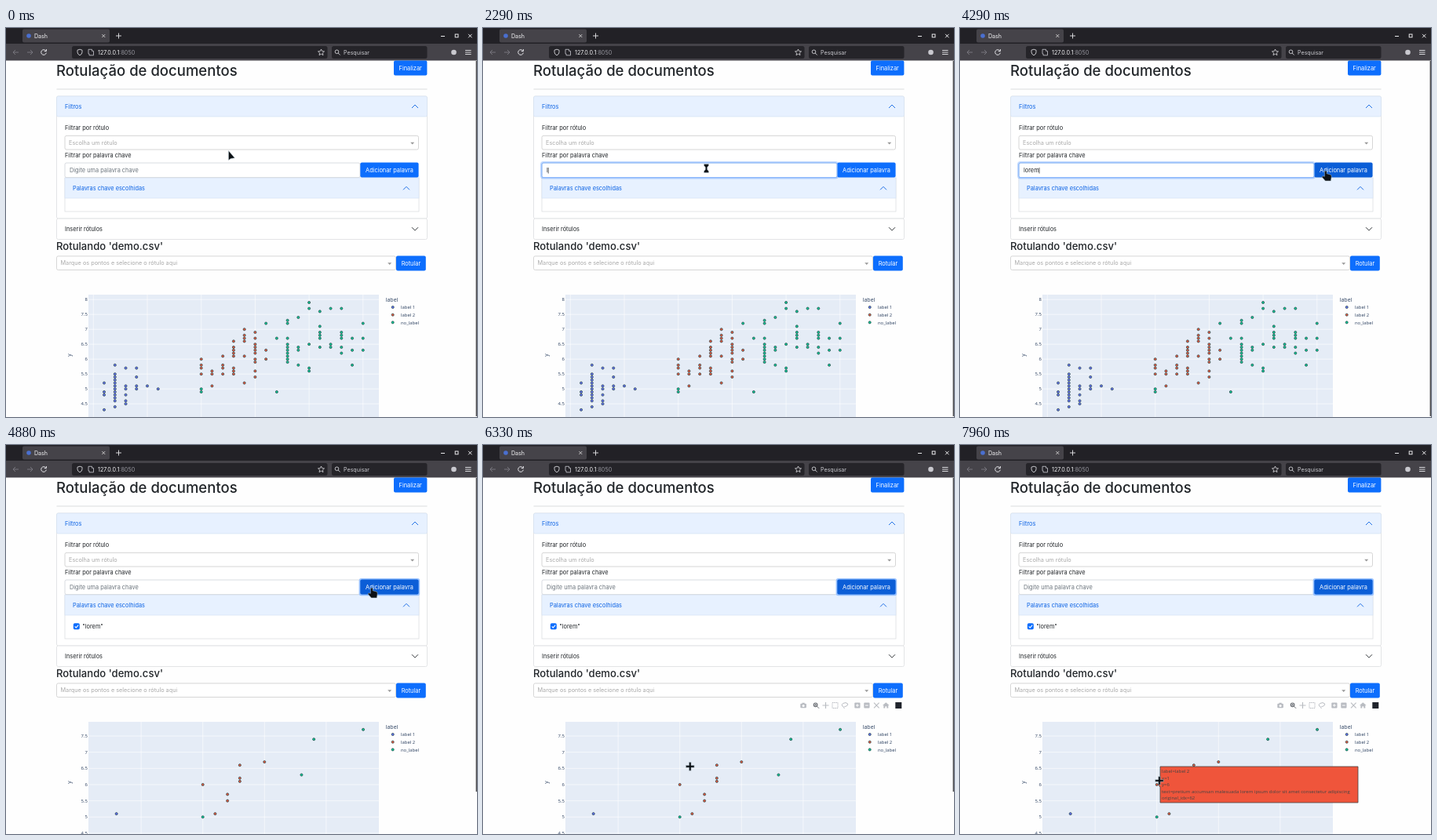
Recreate the animation shown at these times as an HTML page. Size 600 by 496 pixels, loop 8000 ms.

```html
<!DOCTYPE html>
<html lang="pt">
<head>
<meta charset="utf-8">
<title>Dash</title>
<style>
  html, body { margin: 0; width: 100%; height: 100%; overflow: hidden; background: #fefefe; }
  svg { display: block; width: 600px; height: 496px; }
  text { font-family: Inter, sans-serif; font-size: 7.38px; fill: #212529; white-space: pre; }
  .plot text { font-family: "Open Sans", sans-serif; font-size: 5.9px; fill: #2a3f5f; }
</style>
</head>
<body>
<svg id="stage" viewBox="0 0 600 496"></svg>
<script>
const LOOP = 8000, SHIFT = 13;
const BLUE = '#0d6efd', PALE = '#e7f1ff', LINE = '#dcdee0', DEEP = '#0b5ed7';
const stage = document.getElementById('stage');

function add(parent, tag, attrs = {}, content) {
  const node = document.createElementNS('http://www.w3.org/2000/svg', tag);
  for (const key in attrs) node.setAttribute(key, attrs[key]);
  if (content !== undefined) node.textContent = content;
  parent.appendChild(node);
  return node;
}
const group = (parent, attrs) => add(parent, 'g', attrs);
const box = (parent, x, y, width, height, fill, more) =>
  add(parent, 'rect', { x, y, width, height, fill, ...more });
const label = (parent, x, y, str, more) => add(parent, 'text', { x, y, ...more }, str);
const line = (parent, d, stroke, width = 1, more) =>
  add(parent, 'path', { d, fill: 'none', stroke, 'stroke-width': width, ...more });
const dot = (parent, cx, cy, r, fill, more) => add(parent, 'circle', { cx, cy, r, fill, ...more });
const show = (node, on) => node.setAttribute('visibility', on ? 'visible' : 'hidden');
const clamp = v => Math.max(0, Math.min(1, v));

function button(parent, x, y, width, str) {
  const face = box(parent, x, y, width, 19, BLUE, { rx: 2 });
  label(parent, x + width / 2, y + 12.3, str, { 'text-anchor': 'middle', style: 'fill:#fff' });
  return face;
}
function chevron(parent, x, y, dir, color) {
  line(parent, `M${x - 4} ${y + 2 * dir}l4 ${-4 * dir}l4 ${4 * dir}`, color, .9);
}
function select(parent, x, y, width, str) {
  box(parent, x, y, width, 17.6, '#fff', { rx: 2, stroke: '#ccc', 'stroke-width': .8 });
  label(parent, x + 5, y + 11.5, str, { style: 'fill:#aaa;font-size:7.3px' });
  add(parent, 'path', { d: `M${x + width - 10.3} ${y + 8.4}h5l-2.5 2.6z`, fill: '#999' });
}

// Browser frame
const STRIP = '#222126', TOOLBAR = '#454349', FIELD = '#252429';
const bar = group(stage);
box(bar, 0, 0, 600, 20, STRIP);
box(bar, 0, 20, 600, 21.5, TOOLBAR);
box(bar, 21, 1.5, 111, 17, TOOLBAR, { rx: 2 });
dot(bar, 29, 10, 2.8, '#4a6fd0');
label(bar, 36, 12.6, 'Dash', { style: 'fill:#f4f4f6;font-size:7.1px' });
line(bar, 'M122.3 8l4 4m0-4l-4 4', '#ddd', .8);
line(bar, 'M140 10h7m-3.5-3.5v7', '#e8e8ea', .9);
line(bar, 'M554 10.5h5M589 7.8l4.5 4.5m0-4.5l-4.5 4.5', '#e8e8ea');
box(bar, 572.2, 8, 3.8, 3.8, 'none', { stroke: '#e8e8ea' });
box(bar, 84, 23, 325.5, 16, FIELD, { rx: 2.5 });
box(bar, 415, 23, 121.5, 16, FIELD, { rx: 2.5 });
line(bar, 'M16 31h-7m3-3l-3 3l3 3M27 31h7m-3-3l3 3l-3 3', '#7d7c84', .9);
line(bar, 'M50.7 29a3.3 3.3 0 1 0 .6 2.6M51.4 27v2.6h-2.6', '#e6e6ea');
line(bar, 'M94 27.2l3 1v2.6q0 2.7-3 4q-3-1.3-3-4v-2.6z', '#d5d5da', .9);
line(bar, 'M105 27.3h4.5v2h2v5.5h-5.5v-2h-1z', '#b9b9c0', .9);
const url = label(bar, 117, 33.7, '', { style: 'fill:#f4f4f6;font-size:7.2px' });
add(url, 'tspan', {}, '127.0.0.1');
add(url, 'tspan', { fill: '#97979f' }, ':8050');
line(bar, 'M401.5 27l1.2 2.6l2.8.3l-2.1 1.9l.6 2.8l-2.5-1.5l-2.5 1.5l.6-2.8l-2.1-1.9l2.8-.3z', '#dcdce0', .8);
dot(bar, 421.5, 30.3, 2.3, 'none', { stroke: '#d5d5da', 'stroke-width': .9 });
line(bar, 'M423.2 32l2.5 2.5', '#d5d5da', .9);
label(bar, 430, 33.6, 'Pesquisar', { style: 'fill:#c9c9cf;font-size:7.1px' });
dot(bar, 570.5, 31, 3.3, '#c9c9cf');
line(bar, 'M585 28.5h7.5M585 31h7.5M585 33.5h7.5', '#e6e6ea', .9);

// Page, fixed upper part
const page = group(stage);
label(page, 64, 60.8, 'Rotulação de documentos', { style: 'font-size:18.55px;font-weight:500' });
button(page, 494, 41.6, 42.4, 'Finalizar');
line(page, 'M64.5 78H536.5', '#d0d2d4', .8);

const card = box(page, 64.5, 87, 472, 156, '#fff', { stroke: LINE, 'stroke-width': .8, rx: 2 });
box(page, 64.5, 87, 472, 26, PALE, { stroke: '#d2dff0', 'stroke-width': .6, rx: 2 });
label(page, 75, 103, 'Filtros', { style: 'fill:#0c63e4' });
chevron(page, 521, 100, 1, '#0c63e4');
label(page, 75, 130, 'Filtrar por rótulo');
select(page, 75, 137.4, 450.5, 'Escolha um rótulo');
label(page, 75, 164.5, 'Filtrar por palavra chave');

const inner = box(page, 75, 191, 451, 43, '#fff', { stroke: LINE, 'stroke-width': .8 });
box(page, 75, 191, 451, 26, PALE, { stroke: '#d2dff0', 'stroke-width': .6 });
label(page, 85, 207.3, 'Palavras chave escolhidas', { style: 'fill:#0c63e4' });
chevron(page, 510, 204.3, 1, '#0c63e4');

box(page, 75, 172, 376, 18.6, '#fff', { stroke: '#ced4da', 'stroke-width': .8, rx: 2 });
const typed = label(page, 81, 184, '');
const caret = line(page, 'M0 178v7.5', '#222', .7);
const glow = box(page, 449.6, 169.9, 77.6, 22.4, '#98c1fe', { rx: 3 });
const addBtn = button(page, 451.3, 171.6, 74.3, 'Adicionar palavra');
const ring = group(page);
box(ring, 74, 171, 378, 20.6, 'none', { stroke: BLUE, 'stroke-opacity': .25, 'stroke-width': 2, rx: 3 });
box(ring, 75, 172, 376, 18.6, 'none', { stroke: '#86b7fe', rx: 2 });

const word = group(page);
box(word, 85.8, 227.2, 8, 8, BLUE, { rx: 1.8 });
line(word, 'M87.7 231.3l1.6 1.6l2.9-3.2', '#fff', 1.1);
label(word, 97.3, 234, '"lorem"');

// Page, part that slides down when a keyword is added
const low = group(page);
box(low, 64.5, 243, 472, 26.5, '#fff', { stroke: LINE, 'stroke-width': .8, rx: 2 });
label(low, 75, 259, 'Inserir rótulos');
chevron(low, 521, 256.2, -1, '#212529');
label(low, 64, 283.3, "Rotulando 'demo.csv'", { style: 'font-size:13.1px;font-weight:500' });
select(low, 64.5, 290.9, 432, 'Marque os pontos e selecione o rótulo aqui');
button(low, 497, 290.5, 37.8, 'Rotular');

// Charts: tenths of x -> tenths of y, one map per series
const COLORS = ['#636efa', '#ef553b', '#00cc96'];
const ALL = [
  { 1: [43, 48, 49, 52], 2: [44, 46, 47, 48, 49, 50, 51, 52, 53, 54, 55, 58],
    3: [45, 46, 48, 50, 51, 57], 4: [50, 51, 54, 57], 5: [51], 6: [50] },
  { 10: [55, 57, 58, 60], 11: [51, 55, 56], 12: [55, 57, 58, 61],
    13: [55, 56, 57, 61, 62, 63, 64, 66], 14: [52, 61, 66, 67, 68, 70],
    15: [54, 56, 59, 60, 62, 63, 64, 65, 67, 69], 16: [60, 63] },
  { 10: [49, 50], 16: [72], 17: [49, 67], 18: [59, 60, 61, 62, 63, 64, 65, 67, 72, 73],
    19: [58, 63, 64, 74], 20: [56, 57, 65, 77, 79], 21: [64, 67, 68, 69, 71, 76],
    22: [64, 65, 77], 23: [62, 64, 67, 68, 69, 77], 24: [58, 63, 67], 25: [63, 67, 72] }
];
const FOUND = [
  { 3: [51] },
  { 10: [60], 11: [51], 12: [55, 57], 13: [61, 62, 66], 15: [67] },
  { 10: [50], 18: [63], 19: [74], 23: [77] }
];

function chart(series, { x0, dx, y0, dy, from, to, max }) {
  const g = group(low, { class: 'plot' });
  const px = v => x0 + v * dx, py = v => y0 - v * dy;
  box(g, 105, 340, 370, 170, '#e5ecf6');
  for (let v = from; v <= to; v += 5) line(g, `M${px(v)} 340V510`, '#fff', .6);
  for (let v = max; v >= 45; v -= 5) {
    line(g, `M105 ${py(v)}H475`, '#fff', .6);
    label(g, 103.8, py(v) + 2.1, v / 10, { 'text-anchor': 'end' });
  }
  label(g, 0, 0, 'y', { transform: 'translate(83 417) rotate(-90)', 'text-anchor': 'middle', style: 'font-size:6.6px' });
  label(g, 483.7, 348.5, 'label', { style: 'font-size:7px' });
  const mark = (x, y, i) => dot(g, x, y, 1.55, COLORS[i], { stroke: '#2f4f4f', 'stroke-width': .8 });
  ['label 1', 'label 2', 'no_label'].forEach((name, i) => {
    mark(492.7, 356 + i * 9.7, i);
    label(g, 503, 358.1 + i * 9.7, name);
  });
  series.forEach((cols, i) => {
    for (const x in cols) for (const y of cols[x]) mark(px(+x), py(y), i);
  });
  return g;
}
const before = chart(ALL, { x0: 111.3, dx: 13.74, y0: 650.2, dy: 3.8, from: 0, to: 25, max: 80 });
const after = chart(FOUND, { x0: 93.5, dx: 15.72, y0: 667.8, dy: 4.13, from: 5, to: 20, max: 75 });

// Chart toolbar
const tools = group(stage);
const GREY = '#b9bcc2';
box(tools, 404.3, 329.8, 7.6, 5.4, GREY, { rx: 1 });
box(tools, 406.5, 328.7, 3.2, 2, GREY);
dot(tools, 408.1, 332.5, 1.5, '#fff');
dot(tools, 423.6, 331.3, 2.3, 'none', { stroke: '#6c7076', 'stroke-width': 1.2 });
line(tools, 'M425.4 333.1l2.7 2.7M422.4 331.3h2.4m-1.2-1.2v2.4', '#6c7076');
line(tools, 'M432.5 332h8m-4-4v8', GREY, 1.2);
box(tools, 445, 328.5, 7, 7, 'none', { stroke: GREY, 'stroke-dasharray': '1.5 .8' });
line(tools, 'M459.5 334q-4-2-1-4.5q4-2 6 .3q1 3-4 3.8q-2 .8 0 2.4', GREY);
for (const x of [473.3, 485.3]) box(tools, x, 328.4, 7.2, 7.2, GREY, { rx: 1 });
line(tools, 'M475 332h3.8m-1.9-1.9v3.8M487 332h3.8', '#fff');
line(tools, 'M498 328.7l6.6 6.6m0-6.6l-6.6 6.6', GREY, 1.1);
add(tools, 'path', { d: 'M509 332l4.3-3.8l4.3 3.8h-1.3v3.5h-2v-2.2h-2v2.2h-2v-3.5z', fill: GREY });
box(tools, 525.3, 328, 8, 8, '#20242c');

// Hover label
const tip = group(stage, { class: 'plot' });
add(tip, 'path', { d: 'M255 410H507V456H255V436L252 433L255 430Z', fill: '#ef553b', stroke: '#444', 'stroke-width': .8 });
['label=label 2', 'x=1', 'y=6',
  'text=pretium accumsan malesuada lorem ipsum dolor sit amet consectetur adipiscing',
  'original_idx=62'
].forEach((row, i) => label(tip, 257, 418 + i * 8.5, row, { style: 'font-size:6px;fill:#444' }));

const thumb = box(stage, 598.6, 42, 1.4, 453, '#4a4a4e');

// Pointer shapes, hot spot at 0,0
const pointer = group(stage);
const INK = { fill: '#0c1014', stroke: '#b9cad2', 'stroke-width': .5, 'stroke-linejoin': 'round' };
const shape = d => add(pointer, 'path', { d, ...INK });
const shapes = {
  arrow: shape('M0 0V12L2.9 10L7.9 9.2Z'),
  beam: shape('M-3-5.4H3V-3.6L1.2-1.5V1.5L3 3.6V5.4H-3V3.6L-1.2 1.5V-1.5L-3-3.6Z'),
  hand: shape('M-1.6 .5Q-.2-1.4 1.2 .5V3.2L6.2 4.6Q7.4 5.2 7.2 7.4L6.4 12.4H-.6L-5 7.6Q-4.8 5.4-1.6 6.8Z'),
  cross: shape('M-1.3-5.3H1.3V-1.3H5.3V1.3H1.3V5.3H-1.3V1.3H-5.3V-1.3H-1.3Z')
};

const ease = {
  hold: () => 0,
  both: k => k * k * (3 - 2 * k),
  into: k => k * k,
  out: k => 1 - (1 - k) * (1 - k)
};
// time, x, y, easing towards the next stop
const PATH = [
  [0, 283.5, 156.5, 'hold'], [920, 283.5, 156.5, 'both'],
  [1440, 284.5, 179, 'hold'], [3400, 284.5, 179, 'both'],
  [4210, 466, 182.5, 'hold'], [5400, 466, 182.5, 'into'],
  [5790, 338.7, 272, 'out'], [6600, 254.5, 427, 'hold'],
  [7040, 254.5, 427, 'both'], [7170, 254, 428, 'hold'], [LOOP, 254, 428, 'hold']
];
const POINTERS = [[0, 'arrow'], [1250, 'beam'], [4040, 'hand'], [5645, 'arrow'], [5755, 'hand'], [5815, 'arrow'], [6040, 'cross']];
const TYPING = 2250, KEY_GAP = 90, CLICK = 4500, ADDED = 4660, FILTERED = 4860;

const last = (rows, t) => rows.filter(r => r[0] <= t).pop();
const between = (t, a, b) => t >= a && t < b;

function place(t) {
  const i = PATH.findIndex((p, n) => t < PATH[n + 1][0]);
  const [t0, x0, y0, mode] = PATH[i], [t1, x1, y1] = PATH[i + 1];
  const k = ease[mode]((t - t0) / (t1 - t0));
  return [x0 + (x1 - x0) * k, y0 + (y1 - y0) * k];
}

// The overlay scrollbar fades when the pointer rests
function thumbAlpha(t) {
  if (t < 3420) return clamp((2700 - t) / 200);
  return clamp((t - 3420) / 100) * clamp((7960 - t) / 130);
}

function draw(t) {
  const [x, y] = place(t);
  pointer.setAttribute('transform', `translate(${x} ${y})`);
  const kind = last(POINTERS, t)[1];
  for (const name in shapes) show(shapes[name], name === kind);

  const added = t >= ADDED, filtered = t >= FILTERED;
  const count = added || t < TYPING ? 0 : Math.floor((t - TYPING) / KEY_GAP) + 1;
  typed.textContent = count ? 'lorem'.slice(0, count) : 'Digite uma palavra chave';
  typed.style.fill = count ? '#212529' : '#6c757d';

  const focus = t < CLICK ? (t - 1750) / 150 : 1 - (t - CLICK) / 150;
  ring.setAttribute('opacity', clamp(focus));
  show(caret, between(t, 1760, 3040) || between(t, 3640, CLICK));
  const end = count ? typed.getComputedTextLength() : 0;
  caret.setAttribute('transform', `translate(${81.4 + end} 0)`);

  glow.setAttribute('opacity', clamp((t - CLICK) / 150));
  addBtn.setAttribute('fill', t >= 4040 ? DEEP : BLUE);

  const drop = added ? SHIFT : 0;
  card.setAttribute('height', 156 + drop);
  inner.setAttribute('height', 43 + drop);
  low.setAttribute('transform', `translate(0 ${drop})`);
  show(word, added);
  show(before, !filtered);
  show(after, filtered);
  thumb.setAttribute('height', added ? 400 : 453);
  thumb.setAttribute('opacity', thumbAlpha(t));
  show(tools, t >= 5950);
  show(tip, t >= 6420);
}

const start = performance.now();
function tick() {
  draw((performance.now() - start) % LOOP);
  requestAnimationFrame(tick);
}
tick();
</script>
</body>
</html>
```
